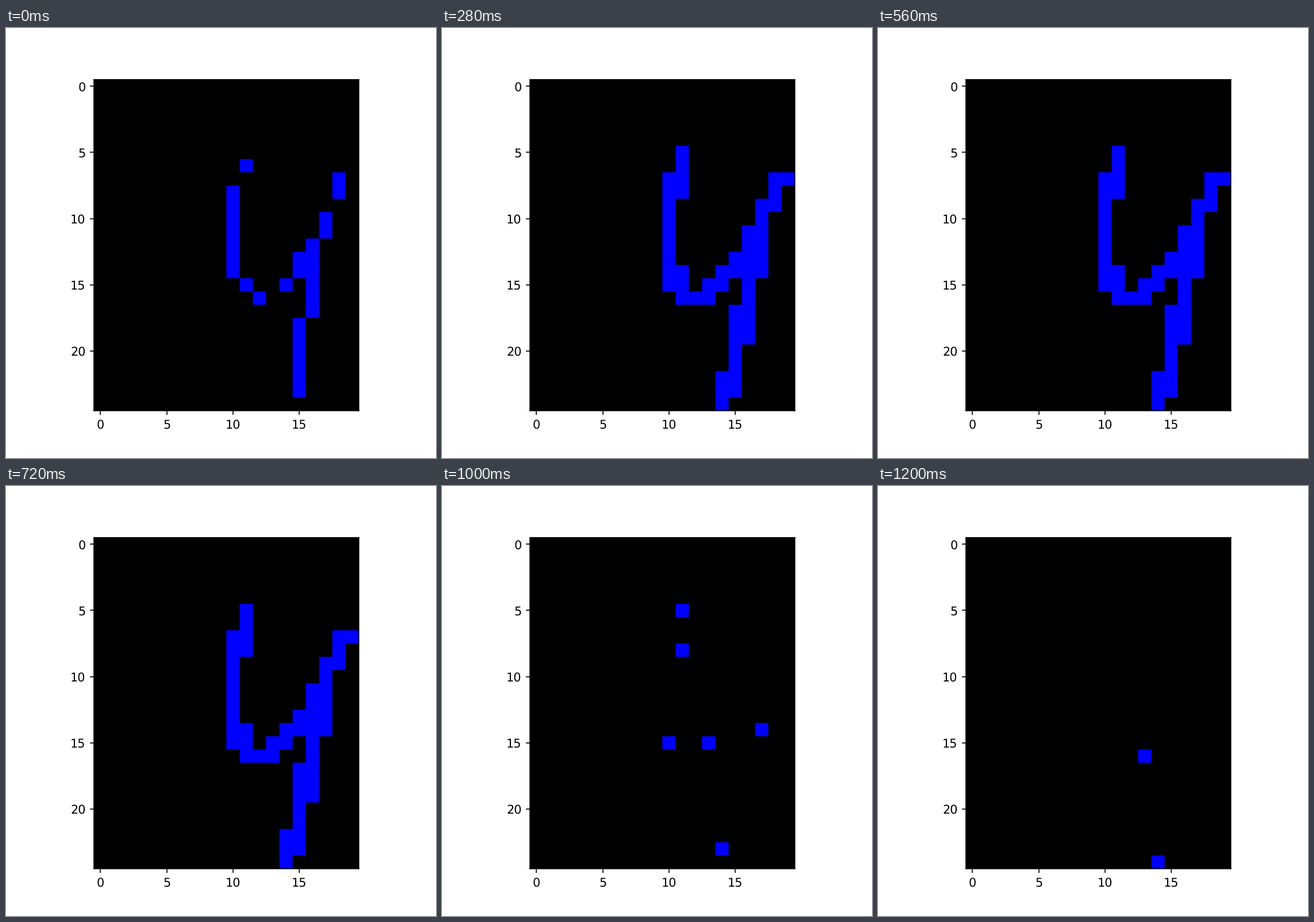
A matplotlib script for the animation above (1240 ms loop, 748x748 px).

```python
import numpy as np
import matplotlib.pyplot as plt
from matplotlib.animation import FuncAnimation
from matplotlib.patches import PathPatch
from matplotlib.path import Path

FRAMES = 31
ROWS, COLS = 25, 20

# Pen strokes of the letter as (column, row) key points, top to bottom
HOOK = [(11, 5.7), (10.5, 7), (10.1, 9), (10.1, 13), (10.7, 15), (11.55, 16)]
ARM = [(15.42, 13), (13.68, 15), (12.52, 16)]
TAIL = [(18.38, 7), (17.5, 9), (16.55, 11), (16.26, 14), (15.42, 18),
        (15.16, 21), (14.57, 22), (14.68, 23), (14.08, 23.6)]

CORE, EDGE, OUTER = 0.46, 0.745, 0.59   # distances from the pen line
FIRST = 3.7                             # time of the first edge spike


def stroke_distance(points):
    """Sideways distance of each cell from a stroke, plus any overshoot of its ends."""
    x, y = np.transpose(points)
    rows = np.arange(ROWS)
    overshoot = np.maximum(0, np.maximum(y[0] - rows, rows - y[-1]))
    sideways = np.abs(np.arange(COLS) - np.interp(rows, y, x)[:, None])
    return sideways + overshoot[:, None]


dist = np.min([stroke_distance(s) for s in (HOOK, ARM, TAIL)], axis=0)
core = dist < CORE
edge = (dist >= CORE) & (dist < EDGE)
period = 3.865 - 0.22 * dist

# Core cells fire together, at slowly growing intervals
beat = np.arange(9)
core_spikes = set((3.5 * beat + 0.031 * beat**2).astype(int).tolist())


def active_cells(frame):
    # Outer edge cells miss their first spike
    count = np.ceil((frame - FIRST) / period)
    fires = (FIRST + count * period < frame + 1) & (count >= (dist > OUTER))
    lit = edge & fires
    return lit | core if frame in core_spikes else lit


def cell_path(frame):
    # One compound path, so that neighbouring cells join without seams
    squares = []
    for row, col in np.argwhere(active_cells(frame)):
        corners = np.array([(0, 0), (1, 0), (1, 1), (0, 1), (0, 0)])
        squares.append(Path(corners + (col - 0.5, row - 0.5), closed=True))
    return Path.make_compound_path(*squares) if squares else Path(np.empty((0, 2)))


plt.rcParams["font.family"] = "DejaVu Sans"
plt.rcParams["text.hinting"] = "none"
fig, ax = plt.subplots(figsize=(5, 5), dpi=149.6)
ax.set_facecolor("black")
cells = ax.add_patch(PathPatch(cell_path(0), facecolor="#0000ff",
                               edgecolor="none", linewidth=0))
ax.set(xlim=(-0.5, COLS - 0.5), ylim=(ROWS - 0.5, -0.5), aspect="equal",
       xticks=range(0, COLS, 5), yticks=range(0, ROWS, 5))
for artist in (ax.patch, cells, *ax.spines.values()):
    artist.set_snap(False)


def update(frame):
    cells.set_path(cell_path(frame))
    return [cells]


anim = FuncAnimation(fig, update, frames=FRAMES, interval=40,
                     repeat=True, repeat_delay=0)
plt.show()
```
